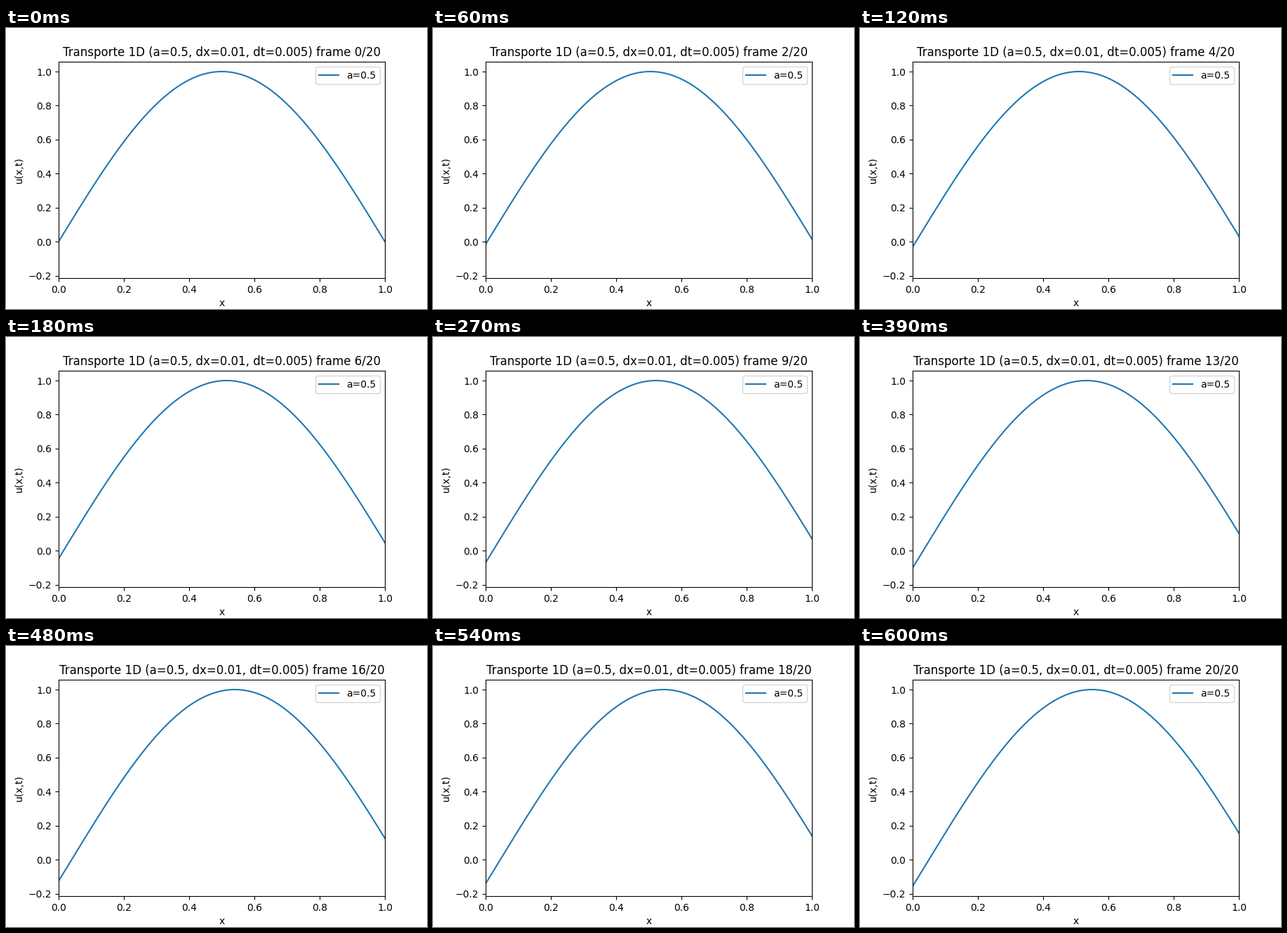
These frames come from a looping animation (600 by 400 pixels, 630 ms). A matplotlib script:

```python
import matplotlib.pyplot as plt
import numpy as np
from matplotlib.animation import FuncAnimation

SPEED, DX, DT = 0.5, 0.01, 0.005
STEPS = 20

x = np.linspace(0, 1, round(1 / DX) + 1)


def wave(step):
    """Sine profile carried to the right at constant speed."""
    return np.sin(np.pi * (x - SPEED * DT * step))


# Limits cover every step, with a 5 % margin.
low, high = wave(STEPS).min(), 1.0
margin = 0.05 * (high - low)

fig, ax = plt.subplots(figsize=(6, 4), dpi=100)
line, = ax.plot(x, wave(0), label=f"a={SPEED}")
ax.set_xlim(0, 1)
ax.set_ylim(low - margin, high + margin)
ax.set_xlabel("x")
ax.set_ylabel("u(x,t)")
ax.legend(loc="upper right")
title = ax.set_title("")


def update(step):
    line.set_ydata(wave(step))
    title.set_text(
        f"Transporte 1D (a={SPEED}, dx={DX}, dt={DT}) frame {step}/{STEPS}"
    )
    return line, title


anim = FuncAnimation(fig, update, frames=STEPS + 1, interval=30,
                     repeat=True, repeat_delay=0)
plt.show()
```
